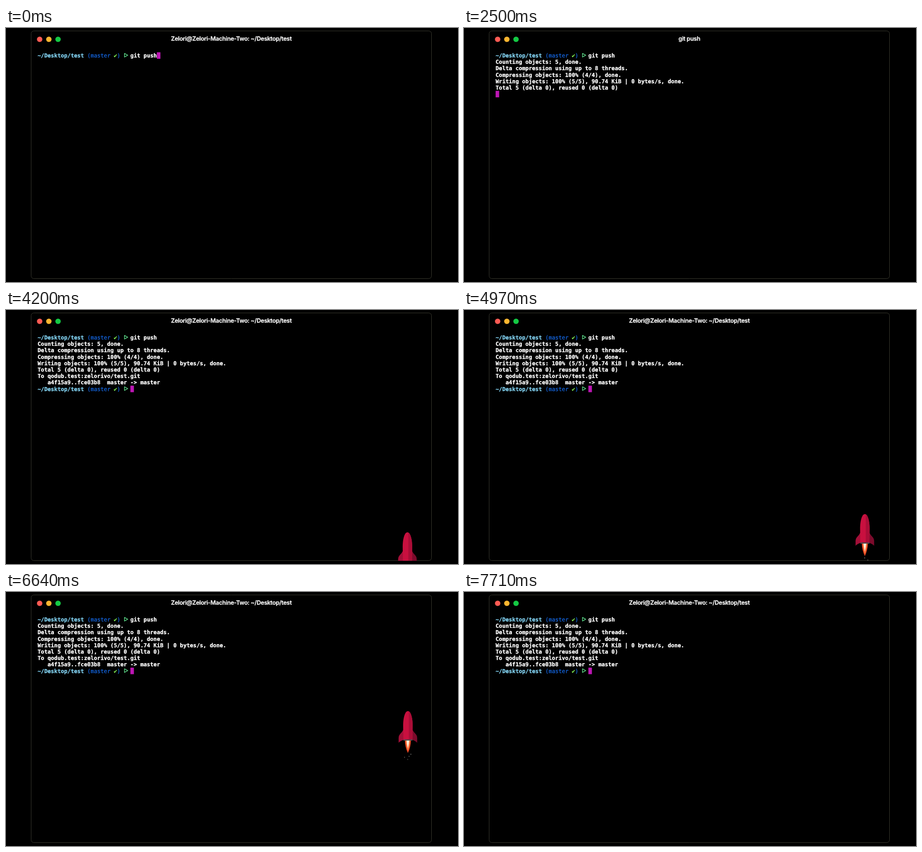
Animation of 998 by 561 pixels, one loop 7750 ms. Source, as an HTML page with a canvas:

```html
<!DOCTYPE html>
<html lang="en">
<head>
<meta charset="utf-8">
<title>Terminal launch</title>
<style>
html, body { margin: 0; width: 100%; height: 100%; overflow: hidden; background: #000; }
canvas { display: block; width: 998px; height: 561px; }
</style>
</head>
<body>
<canvas id="stage" width="998" height="561"></canvas>
<script>
const ctx = document.getElementById('stage').getContext('2d');
const LOOP = 7750;
const ENTER = 320, DONE = 2880, GONE = 7700;
const LEFT = 69.8, CHAR = 7.315, LINE = 14.19, BASE = 65;
const MONO = '12.15px "DejaVu Sans Mono", monospace';
const HOME = 'Zelori@Zelori-Machine-Two: ~/Desktop/test';

// Output lines with the time each one appears.
const OUTPUT = [
  [1560, 'Counting objects: 5, done.'],
  [1560, 'Delta compression using up to 8 threads.'],
  [1600, 'Compressing objects: 100% (4/4), done.'],
  [1640, 'Writing objects: 100% (5/5), 90.74 KiB | 0 bytes/s, done.'],
  [1720, 'Total 5 (delta 0), reused 0 (delta 0)'],
  [DONE, 'To qodub.test:zelorivo/test.git'],
  [DONE, '   a4f15a9..fce03b8  master -> master']
];

// Text with a hairline outline, for the heavier smoothing of the terminal.
function label(text, x, y, color) {
  ctx.fillStyle = ctx.strokeStyle = color;
  ctx.lineWidth = 0.35;
  ctx.lineJoin = 'round';
  ctx.fillText(text, x, y);
  ctx.strokeText(text, x, y);
}

function mono(text, col, row, color = '#fff', weight = 'bold') {
  ctx.font = weight + ' ' + MONO;
  label(text, LEFT + col * CHAR, BASE + row * LINE, color);
}

function shape(color, build) {
  ctx.beginPath();
  build();
  ctx.fillStyle = color;
  ctx.fill();
}

function drawWindow(title) {
  ctx.strokeStyle = '#3a3a2f';
  ctx.lineWidth = 1;
  ctx.beginPath();
  ctx.roundRect(55.5, 6.5, 884, 547, 6);
  ctx.stroke();
  ['#ff5b54', '#fdb630', '#14c944'].forEach((color, i) => {
    shape(color, () => ctx.arc(74.3 + i * 20.3, 25, 6.1, 0, 7));
    ctx.strokeStyle = 'rgba(0,0,0,0.2)';
    ctx.stroke();
  });
  ctx.font = '600 13px Inter, sans-serif';
  ctx.letterSpacing = '-0.3px';
  ctx.textAlign = 'center';
  label(title, 497.5, 28.4, '#f6f6f6');
  ctx.textAlign = 'left';
  ctx.letterSpacing = '0px';
}

function drawPrompt(row) {
  mono('~/Desktop/test', 0, row, '#82d2f2');
  mono('(master', 15, row, '#1464dc', 'normal');
  mono('✔', 23, row, '#7fe850');
  mono(')', 24, row, '#1464dc', 'normal');
  const y = row * LINE;
  ctx.strokeStyle = '#5fe08c';
  ctx.lineWidth = 1.4;
  ctx.beginPath();
  ctx.moveTo(261.6, 56.2 + y);
  ctx.lineTo(268.8, 60.2 + y);
  ctx.lineTo(261.6, 64.2 + y);
  ctx.closePath();
  ctx.stroke();
}

function drawCursor(col, row) {
  ctx.fillStyle = '#bd16b4';
  ctx.fillRect(LEFT + col * CHAR, 53.6 + row * LINE, 7.8, 14.4);
}

function drawTerminal(t) {
  drawPrompt(0);
  mono('git push', 28, 0);
  const lines = OUTPUT.filter(([start]) => t >= start);
  lines.forEach(([, text], i) => mono(text, 0, i + 1));
  if (t < ENTER) {
    drawCursor(36, 0);
  } else if (t < DONE) {
    drawCursor(0, lines.length + 1);
  } else {
    drawPrompt(8);
    drawCursor(28, 8);
  }
}

function rocketPlace(t) {
  const s = (t - 4200) / 1000;
  return {
    x: 886.3 + 2 * Math.sin(s * 13.1),
    y: 491 - 50 * s - 4.23 * Math.pow(Math.max(s, 0), 3.61)
  };
}

function fin(side, color) {
  shape(color, () => {
    ctx.moveTo(side * 10, 41);
    ctx.quadraticCurveTo(side * 13, 47, side * 17, 50.5);
    ctx.quadraticCurveTo(side * 20.5, 54, side * 20.5, 60);
    ctx.lineTo(side * 20.5, 70);
    ctx.quadraticCurveTo(side * 16, 65, side * 9, 63.5);
    ctx.closePath();
  });
}

function flame(w, top, tip, color) {
  shape(color, () => {
    ctx.moveTo(-w, top);
    ctx.quadraticCurveTo(-w * 0.9, tip - 12, 0, tip);
    ctx.quadraticCurveTo(w * 0.9, tip - 12, w, top);
    ctx.closePath();
  });
}

function bodyPath() {
  ctx.moveTo(0, 0);
  ctx.bezierCurveTo(6.5, 0, 10.5, 15, 10.5, 32);
  ctx.lineTo(10, 63);
  ctx.lineTo(-10, 63);
  ctx.lineTo(-10.5, 32);
  ctx.bezierCurveTo(-10.5, 15, -6.5, 0, 0, 0);
}

function drawRocket(t) {
  const { x, y } = rocketPlace(t);
  const flick = Math.sin(t / 38);
  ctx.save();
  ctx.beginPath();
  ctx.rect(56, 2, 883, 552);
  ctx.clip();
  ctx.translate(x, y);

  flame(6.8, 64, 94 + flick * 1.5, '#e8431f');
  flame(5, 64, 89 + flick, '#f9793f');
  flame(3, 64, 83 + flick, '#fff3df');

  fin(-1, '#a30f38');
  fin(1, '#7c0b2c');
  shape('#c8103f', bodyPath);
  ctx.save();
  ctx.beginPath();
  bodyPath();
  ctx.clip();
  ctx.fillStyle = '#aa0d37';
  ctx.fillRect(2, 0, 10, 64);
  ctx.restore();
  ctx.fillStyle = '#4c4d52';
  ctx.fillRect(-10, 62.8, 20, 2.4);

  // Sparks falling below the flame.
  for (let i = 0; i < 4; i++) {
    const p = (t / 460 + i * 0.29) % 1;
    ctx.fillStyle = `rgba(165,165,160,${0.9 - p * 0.5})`;
    ctx.fillRect([-8, -1, 6, 2][i], 94 + p * 16, 1.2, 2.4);
  }
  ctx.restore();
}

function draw(t) {
  ctx.fillStyle = '#000';
  ctx.fillRect(0, 0, 998, 561);
  drawWindow(t >= ENTER && t < DONE ? 'git push' : HOME);
  drawTerminal(t);
  if (t >= DONE && t < GONE) drawRocket(t);
}

ctx.textRendering = 'geometricPrecision';
const begin = performance.now();
function tick() {
  draw((performance.now() - begin) % LOOP);
  requestAnimationFrame(tick);
}
tick();
</script>
</body>
</html>
```
